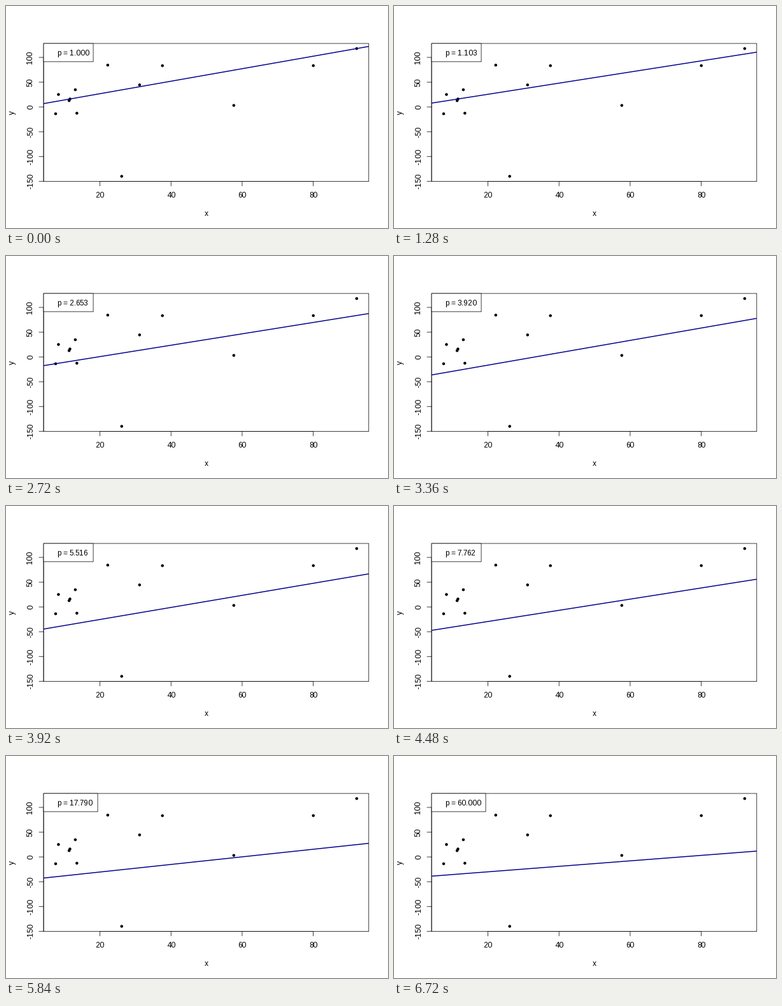
A matplotlib script that plays this animation: 600 by 350 pixels, repeating every 7.72 s.

```python
import numpy as np
import matplotlib.pyplot as plt
from matplotlib.animation import FuncAnimation
from matplotlib.patches import Circle, Rectangle

plt.rcParams.update({
    "font.family": "Liberation Sans",
    "text.hinting_factor": 1,
    "path.snap": False,
})

W, H, DPI = 600, 350, 100
PX = 72 / DPI
INTERVAL, LOOP = 40, 7720
HOLD, STEP = 1200, 80

# Plot region and data, all in stage pixels with y pointing down.
LEFT, RIGHT, TOP, BOTTOM = 59.04, 569.76, 59.04, 276.56
POINTS = np.array([
    (77.96, 169.9), (82.4, 139.5), (99.1, 149.2), (100.4, 146.6),
    (108.9, 132.0), (111.3, 169.0), (159.8, 93.2), (181.7, 268.5),
    (209.8, 124.4), (245.7, 94.1), (357.8, 156.7), (482.7, 94.0),
    (550.84, 67.1),
])
X, Y = POINTS.T


def weighted_line(w):
    w = w / w.sum()
    mx, my = w @ X, w @ Y
    slope = (w * (X - mx)) @ (Y - my) / (w @ (X - mx) ** 2)
    return np.array([my - slope * mx, slope])


def fit(p, start):
    """Line minimising sum |residual|^p, by reweighted least squares."""
    coef = start
    damping = 1 / max(1, p - 1)
    for _ in range(400 if p < 2 else 60):
        r = np.maximum(np.abs(Y - coef[0] - coef[1] * X), 1e-6)
        target = weighted_line((r / r.max()) ** (p - 2))
        coef = coef + damping * (target - coef)
    return coef


def fit_all():
    least_squares = weighted_line(np.ones(len(X)))
    powers, lines, coef = [], [], least_squares
    for k in range(84):
        p = 1.05 ** k
        coef = fit(p, least_squares if p < 2 else coef)
        if k < 70:
            powers.append(p)
            lines.append(coef)
    powers.append(60.0)
    lines.append(fit(60.0, coef))
    return powers, lines


powers, lines = fit_all()

fig = plt.figure(figsize=(W / DPI, H / DPI), dpi=DPI, facecolor="white")
ax = fig.add_axes([0, 0, 1, 1])
ax.set(xlim=(0, W), ylim=(H, 0))
ax.axis("off")


def stroke(xs, ys):
    ax.plot(xs, ys, color="black", lw=0.75 * PX, solid_capstyle="round")


def label(x, y, text, **kw):
    return ax.text(x, y, text, fontsize=12 * PX, color="black",
                   va="baseline", rotation_mode="anchor", **kw)


def frame_box(right, bottom, **kw):
    box = Rectangle((LEFT, TOP), right - LEFT, bottom - TOP,
                    edgecolor="black", lw=0.75 * PX, **kw)
    return ax.add_patch(box)


for x, y in POINTS:
    ax.add_patch(Circle((x, y), 2.25, color="black", lw=0, zorder=2))

x_ticks = [(147.5 + 111.7 * i, 20 + 20 * i) for i in range(4)]
y_ticks = [(81.0 + 39.06 * i, 100 - 50 * i) for i in range(6)]
stroke([x_ticks[0][0], x_ticks[-1][0]], [BOTTOM, BOTTOM])
stroke([LEFT, LEFT], [y_ticks[0][0], y_ticks[-1][0]])
for x, value in x_ticks:
    stroke([x, x], [BOTTOM, BOTTOM + 7.2])
    label(x, 302.4, f"{value}", ha="center")
for y, value in y_ticks:
    stroke([LEFT - 7.2, LEFT], [y, y])
    label(41.8, y, f"{value}", ha="center", rotation=90)
label((LEFT + RIGHT) / 2, 331.3, "x", ha="center")
label(13, (TOP + BOTTOM) / 2, "y", ha="center", rotation=90)
frame_box(RIGHT, BOTTOM, fill=False, zorder=3)

ends = np.array([LEFT, RIGHT])
fit_line, = ax.plot([], [], color="#00008b", lw=1.5 * PX,
                    solid_capstyle="butt", zorder=4)
legend_box = frame_box(137.04, 87.84, facecolor="white", zorder=5)
legend_text = label(80.64, 77.8, "", ha="left", zorder=6)


def update(i):
    k = int(np.clip((i * INTERVAL - HOLD) // STEP + 1, 0, len(powers) - 1))
    intercept, slope = lines[k]
    fit_line.set_data(ends, intercept + slope * ends)
    text = f"p = {powers[k]:.3f}"
    legend_text.set_text(text)
    legend_box.set_width(78 + 7 * (len(text) - 9))
    return fit_line, legend_box, legend_text


anim = FuncAnimation(fig, update, frames=LOOP // INTERVAL, interval=INTERVAL,
                     repeat=True, repeat_delay=0)
plt.show()
```
